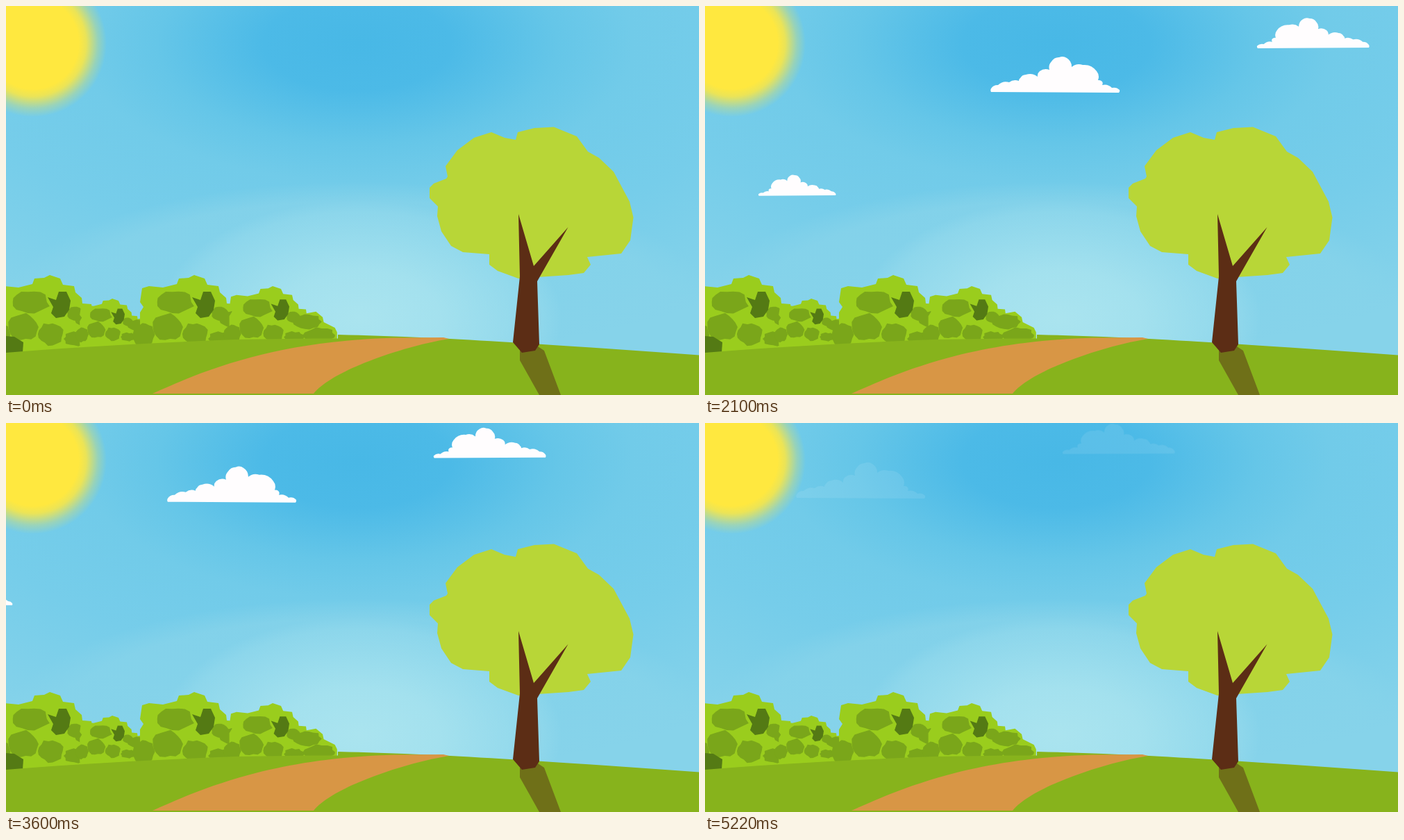
An HTML page for the animation above (5.37 s loop, 998x561 px).

```html
<!DOCTYPE html>
<html lang="en">
<head>
<meta charset="utf-8">
<title>Summer meadow</title>
<style>
html, body { margin: 0; width: 100%; height: 100%; overflow: hidden; background: #7acee9; }
svg { display: block; width: 100%; height: 100%; }
</style>
</head>
<body>
<svg viewBox="0 0 998 561" preserveAspectRatio="none">
  <defs>
    <radialGradient id="sky" gradientUnits="userSpaceOnUse" cx="0" cy="0" r="900" gradientTransform="translate(506 55) scale(1 .5)">
      <stop offset="0" stop-color="#48b8e6"/>
      <stop offset=".15" stop-color="#4cbae7"/>
      <stop offset=".32" stop-color="#65c6e8"/>
      <stop offset=".44" stop-color="#71cbe9"/>
      <stop offset=".65" stop-color="#76cdea"/>
      <stop offset="1" stop-color="#86d3ea"/>
    </radialGradient>
    <radialGradient id="haze">
      <stop offset=".85" stop-color="#86d3ea" stop-opacity=".8"/>
      <stop offset="1" stop-color="#86d3ea" stop-opacity="0"/>
    </radialGradient>
    <radialGradient id="glow">
      <stop offset="0" stop-color="#aae4ef"/>
      <stop offset=".4" stop-color="#aae4ef" stop-opacity=".82"/>
      <stop offset=".9" stop-color="#aae4ef" stop-opacity=".25"/>
      <stop offset="1" stop-color="#aae4ef" stop-opacity="0"/>
    </radialGradient>
    <radialGradient id="sun">
      <stop offset=".62" stop-color="#ffe83f"/>
      <stop offset=".72" stop-color="#ffe83f" stop-opacity=".86"/>
      <stop offset=".88" stop-color="#ffe83f" stop-opacity=".28"/>
      <stop offset="1" stop-color="#ffe83f" stop-opacity="0"/>
    </radialGradient>
    <path id="cloud"/>
    <g id="bush">
      <path fill="#9acd1d" d="M-78 112V54L-73 46L-78 39L-75 19L-65 16L-45 18L-25 13L-22 5L-8 4L0 0L15 5L19 14L35 16L37 25L46 33L47 41L60 42L61 49L78 46L90 56L92 65L112 75L116 83V112Z"/>
      <g id="leaves" fill="#7aa61a"></g>
      <path fill="#547a14" d="M-3 32L9 36L13 24L24 24L30 37L28 50L21 60L9 62L2 55L5 46Z"/>
    </g>
  </defs>
  <rect width="998" height="561" fill="url(#sky)"/>
  <ellipse cx="510" cy="440" rx="520" ry="187" fill="url(#haze)"/>
  <ellipse cx="510" cy="450" rx="290" ry="170" fill="url(#glow)"/>
  <circle cx="39" cy="54" r="106" fill="url(#sun)"/>
  <g id="clouds" fill="#fffdfe">
    <use href="#cloud"/>
    <use href="#cloud" transform="translate(-224 149) scale(-.6 .58)"/>
    <use href="#cloud" transform="translate(544 -64) scale(-.87 .84)"/>
  </g>
  <use href="#bush" transform="translate(63 388)"/>
  <use href="#bush" transform="translate(153 422) scale(.6)"/>
  <use href="#bush" transform="translate(271 388)"/>
  <use href="#bush" transform="translate(384 404) scale(.8)"/>
  <path fill="#547a14" d="M0 476L12 477L25 485L24 500H0Z"/>
  <path fill="#87b31c" d="M0 500Q130 489 330 481L440 479.500H478V474Q560 476 640 480Q770 487 998 503.500V561H0Z"/>
  <path fill="#d89645" d="M211 559C300 518 400 483 560 478.500L630 478L638 480C575 490 470 525 443 559Z"/>
  <path fill="#6f7018" d="M740 497V511L768 561H799L775 497L766 491Z"/>
  <path fill="#b8d637" d="M610 262L616 256L634 249L636 246L633 231L650 208L674 190L699 182L718 190L734 193L737 182L761 176L789 174.500L822 188L838 210L854 219L875 239L898 282L903.500 305L899 338L886 357L837 362L842 373L832 385L810 388L738 393L708 382L696 373V358L658 355L641 346L627 325L621 303L622 289L610 277Z"/>
  <path fill="#5c2d15" d="M738 300L760 375L809.500 319L765 397L768 488L762 497L743 500L730 485L740 390Z"/>
</svg>
<script>
const FRAME = 30, LAST = 5220, LOOP = 5370, FADE = 1050;
const START_X = 686, END_X = 131;
const byId = id => document.getElementById(id);

let seed = 7;
function random() {
  seed = seed * 16807 % 2147483647;
  return seed / 2147483647;
}

// Joins clockwise points with arcs that bulge outward.
function puff(points) {
  const p = points.split(' ').map(s => s.split(',').map(Number));
  return p.map(([x, y], i) => {
    if (!i) return `M${x} ${y}`;
    const r = Math.hypot(x - p[i - 1][0], y - p[i - 1][1]);
    return `A${r} ${r} 0 0 1 ${x} ${y}`;
  }).join('') + 'Z';
}

// An oval with an uneven, leafy edge.
function leafy(cx, cy, rx, ry, corners = 18) {
  const points = Array.from({ length: corners }, (_, i) => {
    const angle = i / corners * 2 * Math.PI, reach = .88 + .24 * random();
    return `${cx + rx * reach * Math.cos(angle)} ${cy + ry * reach * Math.sin(angle)}`;
  });
  return `<path d="M${points.join('L')}Z"/>`;
}

byId('cloud').setAttribute('d', puff('0,0 0,-5 10,-10 26,-14 40,-16 42,-20 50,-25 67,-22 70,-30 84,-32 87,-44 98,-50 109,-49 116,-36 132,-39 152,-30 154,-17 160,-15 160,-10 174,-6 185,-3 184,1'));
byId('leaves').innerHTML =
  leafy(-27, 39, 26, 16) + leafy(-38, 75, 21, 19) + leafy(1, 85, 18, 16) +
  leafy(37, 56, 12, 10) + leafy(62, 64, 24, 14) + leafy(-72, 86, 15, 18) +
  leafy(38, 92, 18, 10) + leafy(84, 88, 28, 13);

// Same curve as a CSS cubic-bezier timing function.
function bezierEase(u, x1, y1, x2, y2) {
  const curve = (s, a, b) => 3 * s * (1 - s) ** 2 * a + 3 * s * s * (1 - s) * b + s ** 3;
  let low = 0, high = 1;
  for (let i = 0; i < 30; i++) {
    const mid = (low + high) / 2;
    if (curve(mid, x1, x2) < u) low = mid; else high = mid;
  }
  return curve(low, y1, y2);
}

function draw(t) {
  const x = START_X + (END_X - START_X) * bezierEase(t / LOOP, .156, .1, .644, 1);
  const lift = 11 * Math.max(0, 1 - t / 540) ** 2;
  const y = 134 + (x - 584) * .0577 + lift;
  const opacity = Math.max(0, Math.min(1, t / FADE, (LAST + 100 - t) / FADE));
  byId('clouds').setAttribute('transform', `translate(${x} ${y})`);
  byId('clouds').setAttribute('opacity', opacity);
}

const start = performance.now();
function tick() {
  const t = (performance.now() - start) % LOOP;
  draw(Math.min(LAST, Math.floor(t / FRAME) * FRAME));
  requestAnimationFrame(tick);
}
tick();
</script>
</body>
</html>
```
